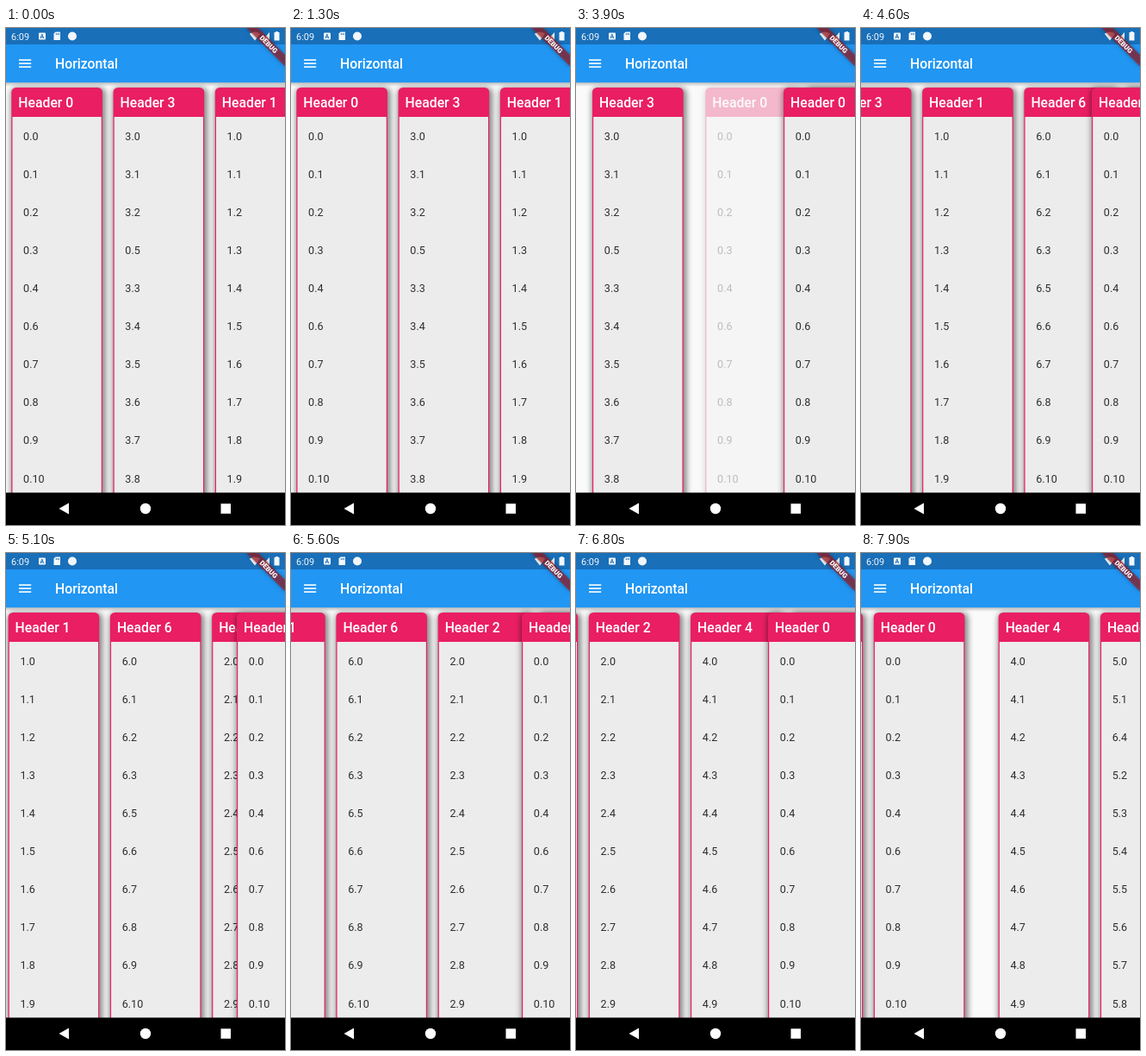
Recreate the animation shown at these times as an HTML page with a canvas. Size 324x576 px, loop 8000 ms.

```html
<!DOCTYPE html>
<html lang="en">
<head>
<meta charset="utf-8">
<title>Horizontal drag and drop lists</title>
<style>
html, body { margin: 0; width: 100%; height: 100%; overflow: hidden; background: #fafafa; }
canvas { display: block; width: 324px; height: 576px; }
</style>
</head>
<body>
<canvas id="stage"></canvas>
<script>
const W = 324, H = 576, LOOP = 8000;
const PITCH = 118.26, COL_W = 105.65, PAD = 13, GAP = 131;
const LIFT = 2300, DROP = 7650;
const PINK = '#e91e63', BODY = '#ececec', PAGE = '#fafafa';

const canvas = document.getElementById('stage');
const ctx = canvas.getContext('2d');
const ratio = window.devicePixelRatio || 1;
canvas.width = W * ratio;
canvas.height = H * ratio;

const clamp = v => Math.max(0, Math.min(1, v));
const ramp = (t, from, to) => clamp((t - from) / (to - from));

// Piecewise path through [time, value] pairs, eased within each leg.
function follow(t, points, ease = p => p) {
  if (t <= points[0][0]) return points[0][1];
  for (let i = 1; i < points.length; i++) {
    const [t0, a] = points[i - 1], [t1, b] = points[i];
    if (t <= t1) return a + (b - a) * ease(ramp(t, t0, t1));
  }
  return points[points.length - 1][1];
}
const smooth = p => p * p * (3 - 2 * p);

// Rows that were moved between lists earlier.
function rowsOf(id) {
  const skip = { 0: 5, 6: 4 }[id];
  const rows = [];
  for (let n = 0; n < 12; n++) if (n !== skip) rows.push(id + '.' + n);
  if (id === 3) rows.splice(3, 0, '0.5');
  if (id === 5) rows.splice(2, 0, '6.4');
  return rows.slice(0, 10);
}
const lists = Array.from({ length: 7 }, (_, id) => ({ title: 'Header ' + id, rows: rowsOf(id) }));

const gaps = [
  { before: 0, open: LIFT, close: 3150, from: 105 },
  { before: 1, open: 3150, close: 4000, from: 0, ghost: true },
  { before: 4, open: 7220, close: DROP, from: 0, ghost: true }
];
const dragPath = [[LIFT, 6.3], [2600, 7], [2800, 10], [3900, 241], [4150, 268],
                  [6400, 268], [6800, 223], [7250, 190], [7550, 178]];
const scrollPath = [[4120, 19], [4600, -47], [5600, -184], [6740, -340]];

function gapWidth(gap, t) {
  if (t < gap.open) return 0;
  const grown = gap.from + (GAP - gap.from) * ramp(t, gap.open, gap.open + 280);
  return grown * (1 - ramp(t, gap.close, gap.close + 315));
}

function text(str, x, y, size, color, weight = 400) {
  ctx.font = `${weight} ${size}px Roboto, sans-serif`;
  ctx.fillStyle = color;
  ctx.fillText(str, x, y);
}

function rect(x, y, w, h, color) {
  ctx.fillStyle = color;
  ctx.fillRect(x, y, w, h);
}

function polygon(color, ...points) {
  ctx.fillStyle = color;
  ctx.beginPath();
  points.forEach(p => ctx.lineTo(...p));
  ctx.fill();
}

function disc(x, y, r, color) {
  ctx.fillStyle = color;
  ctx.beginPath();
  ctx.arc(x, y, r, 0, Math.PI * 2);
  ctx.fill();
}

function column(id, x, width = COL_W) {
  if (x > W + 12 || x + width < -14) return;
  const top = 69, head = 34, { title, rows } = lists[id];
  ctx.save();
  ctx.shadowColor = 'rgba(0,0,0,.45)';
  ctx.shadowBlur = 6.5 * ratio;
  ctx.shadowOffsetX = 1.6 * ratio;
  ctx.shadowOffsetY = 2.4 * ratio;
  ctx.fillStyle = '#777';
  // The shadow caster is pushed off stage so that only its spread shadow shows.
  ctx.shadowOffsetX += 1000 * ratio;
  ctx.beginPath();
  ctx.roundRect(x - 2.4 - 1000, top - 2.4, width + 4.8, 520, 7);
  ctx.fill();
  ctx.restore();

  ctx.fillStyle = PINK;
  ctx.beginPath();
  ctx.roundRect(x, top, width, 520, 5.5);
  ctx.fill();
  rect(x + 1.2, top + head, width - 2.4, 490, BODY);
  text(title, x + 8, 92.3, 15.76, '#fff', 500);
  rows.forEach((row, i) => text(row, x + 13.8, 129.6 + i * 44.1, 12.6, '#2e2e2e'));
}

function ghost(x, slotEnd) {
  ctx.save();
  ctx.beginPath();
  ctx.rect(x - PAD, 60, slotEnd - x + PAD, 480);
  ctx.clip();
  column(0, x);
  ctx.globalAlpha = .7;
  rect(x - PAD, 60, PITCH + PAD * 2, 480, PAGE);
  ctx.restore();
}

function board(t) {
  if (t < LIFT) {
    [0, 3, 1].forEach((id, i) => column(id, 6.3 + i * PITCH));
    return;
  }
  const left = follow(t, scrollPath);
  const order = t < DROP ? [3, 1, 6, 2, 4, 5] : [1, 6, 2, 0, 4, 5];
  const shift = i => gaps.reduce((sum, g) => sum + (g.before <= i ? gapWidth(g, t) : 0), 0);

  gaps.forEach(g => {
    if (!g.ghost || t < g.open || t >= g.close) return;
    const end = left + g.before * PITCH + shift(g.before);
    ghost(end - gapWidth(g, t) + PAD, end);
  });
  order.forEach((id, i) => column(id, left + i * PITCH + shift(i)));
  if (t < DROP) column(0, follow(t, dragPath, smooth), PITCH);
}

function statusIcons() {
  const white = '#f2f7fc', dark = '#196fb8';
  text('6:09', 6, 13.8, 11, white);
  ctx.fillStyle = white;
  ctx.beginPath();
  ctx.roundRect(38, 5.5, 8, 8, 1);
  ctx.fill();
  text('A', 39.6, 12.2, 7, dark, 700);
  polygon(white, [57.5, 4.5], [63, 4.5], [63, 14], [55.5, 14], [55.5, 6.5]);
  for (let i = 0; i < 3; i++) rect(57.8 + i * 1.7, 6, .8, 2, dark);
  disc(77, 9.5, 5, white);

  ctx.fillStyle = white;
  ctx.beginPath();
  ctx.moveTo(289, 14.5);
  ctx.lineTo(282.8, 6.8);
  ctx.quadraticCurveTo(289, 2.2, 295.2, 6.8);
  ctx.fill();
  polygon(white, [297, 14.5], [306, 14.5], [306, 5]);
  rect(311.5, 5, 6, 9.5, white);
  rect(313.2, 4, 2.6, 1.5, white);
}

function debugBanner() {
  ctx.save();
  ctx.translate(W, 0);
  ctx.rotate(Math.PI / 4);
  ctx.shadowColor = 'rgba(0,0,0,.5)';
  ctx.shadowBlur = 5 * ratio;
  rect(-31.5, 22, 63, 9.5, 'rgba(163,25,32,.66)');
  ctx.shadowColor = 'transparent';
  ctx.textAlign = 'center';
  text('DEBUG', 0, 29.6, 8, '#fff', 900);
  ctx.restore();
}

function chrome() {
  const fade = ctx.createLinearGradient(0, 63, 0, 68);
  fade.addColorStop(0, 'rgba(0,0,0,.24)');
  fade.addColorStop(1, 'rgba(0,0,0,0)');
  rect(0, 63, W, 5, fade);
  rect(0, 0, W, 63.2, '#2196f3');
  rect(0, 0, W, 19, '#196fb8');
  for (let i = 0; i < 3; i++) rect(15, 36.3 + i * 4, 14.2, 1.6, '#fff');
  text('Horizontal', 57, 46.8, 15.76, '#fff', 500);
  statusIcons();

  rect(0, 538.5, W, H - 538.5, '#000');
  polygon('#fff', [61.5, 557], [73, 550.5], [73, 563.5]);
  disc(162, 557, 6.2, '#fff');
  rect(249.5, 551.3, 11.5, 11.5, '#fff');
}

function frame(now) {
  ctx.setTransform(ratio, 0, 0, ratio, 0, 0);
  rect(0, 0, W, H, PAGE);
  board(now % LOOP);
  chrome();
  debugBanner();
  requestAnimationFrame(frame);
}
requestAnimationFrame(frame);
</script>
</body>
</html>
```
